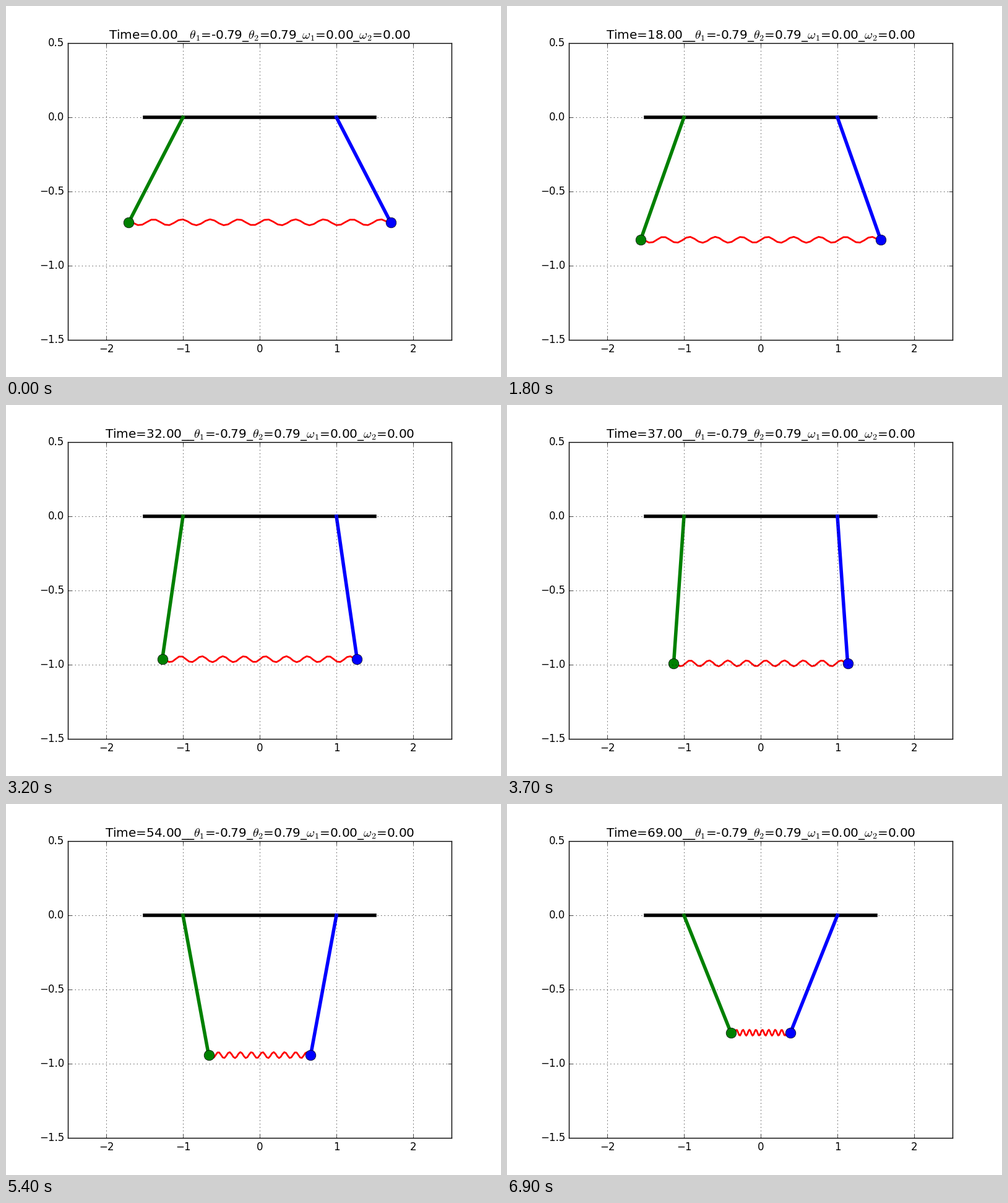
A matplotlib script that plays this animation: 800x600 px, repeating every 7 s.

```python
import numpy as np
import matplotlib.pyplot as plt
from matplotlib.animation import FuncAnimation

plt.style.use("classic")
plt.rcParams.update({"font.sans-serif": ["DejaVu Sans"], "mathtext.fontset": "cm"})

FRAMES, INTERVAL = 70, 100
START = np.pi / 4       # initial angle of each rod
OMEGA = 0.0368          # swing, radians per frame
DAMPING = 0.0001
COILS = np.arange(59)   # spring samples, one radian apart

fig = plt.figure(figsize=(8, 6), dpi=100, facecolor="white")
ax = fig.add_axes([0.125, 0.1, 0.775, 0.8])
ax.set_xlim(-2.5, 2.5)
ax.set_ylim(-1.5, 0.5)
ax.set_xticks(range(-2, 3))
ax.set_yticks(np.arange(-1.5, 0.6, 0.5))
ax.grid(True)

title = ax.set_title("")
ax.plot([-1.5, 1.5], [0, 0], "k-", lw=4)
spring, = ax.plot([], [], "r-", lw=2)


def pendulum(color):
    rod, = ax.plot([], [], color=color, lw=4)
    bob, = ax.plot([], [], "o", color=color, ms=12)
    return rod, bob


left, right = pendulum("green"), pendulum("blue")


def place(parts, pivot, x, y):
    rod, bob = parts
    rod.set_data([pivot, x], [0, y])
    bob.set_data([x], [y])


def swing(frame):
    step = frame + 1
    return START * np.exp(-DAMPING * step) * np.cos(OMEGA * step)


def update(frame):
    angle = swing(frame)
    x, y = 1 + np.sin(angle), -np.cos(angle)
    place(left, -1, -x, y)
    place(right, 1, x, y)
    spring.set_data(np.linspace(-x, x, len(COILS)),
                    y + 0.02 * np.cos(COILS + np.pi / 4))
    title.set_text(rf"Time={frame:.2f}__$\theta_1$={-START:.2f}_$\theta_2$={START:.2f}"
                   r"_$\omega_1$=0.00_$\omega_2$=0.00")
    return [spring, *left, *right, title]


anim = FuncAnimation(fig, update, frames=FRAMES, interval=INTERVAL,
                     repeat=True, repeat_delay=0, blit=False)
plt.show()
```
